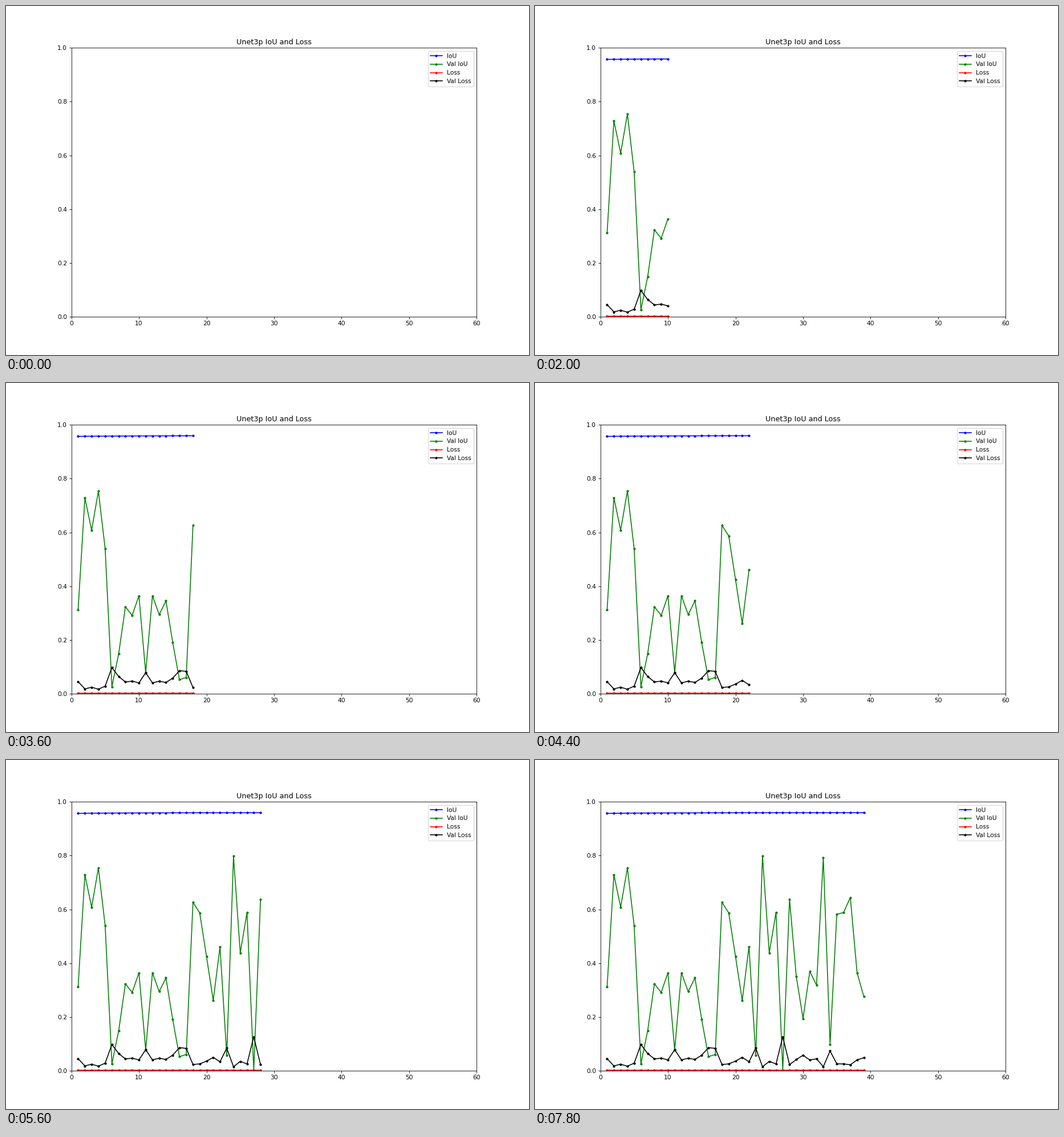
A matplotlib script that plays this animation: 917 by 611 pixels, repeating every 8000 ms.

```python
import numpy as np
import matplotlib.pyplot as plt
from matplotlib.animation import FuncAnimation

W, H, DPI = 917, 611, 76.4

plt.rcParams["font.family"] = "DejaVu Sans"

# Measured validation score per epoch, in thousandths
scores = [313, 729, 608, 754, 539, 26, 148, 323, 291, 364, 77, 364, 294,
          345, 190, 52, 60, 626, 587, 425, 261, 461, 57, 798, 438, 589,
          2, 638, 350, 194, 369, 318, 792, 98, 582, 588, 644, 364, 275]

epochs = np.arange(1, len(scores) + 1)
val_iou = np.array(scores) / 1000
val_loss = 0.158 - 0.152 * val_iou ** 0.25   # loss falls as the score rises
iou = 0.9597 - 0.0025 * np.exp(-(epochs - 1) / 8)
loss = np.full(len(epochs), 0.0025)

curves = {
    "IoU": ("blue", iou),
    "Val IoU": ("green", val_iou),
    "Loss": ("red", loss),
    "Val Loss": ("black", val_loss),
}

# The tiny margin keeps the pixel size from rounding down
fig, ax = plt.subplots(figsize=((W + 0.001) / DPI, (H + 0.001) / DPI), dpi=DPI)
fig.subplots_adjust(left=0.125, right=0.9, bottom=0.11, top=0.88)
ax.set(xlim=(0, 60), ylim=(0, 1), title="Unet3p IoU and Loss")

lines = [ax.plot([], [], marker=".", color=color, label=label)[0]
         for label, (color, _) in curves.items()]
ax.legend(loc="upper right", labelspacing=0.455, borderpad=0.38)


def update(n):
    """Show the first n epochs of every curve."""
    for line, (_, values) in zip(lines, curves.values()):
        line.set_data(epochs[:n], values[:n])
    return lines


anim = FuncAnimation(fig, update, frames=len(epochs) + 1, interval=200,
                     init_func=lambda: update(0), repeat=True,
                     repeat_delay=0, blit=False)
plt.show()
```
